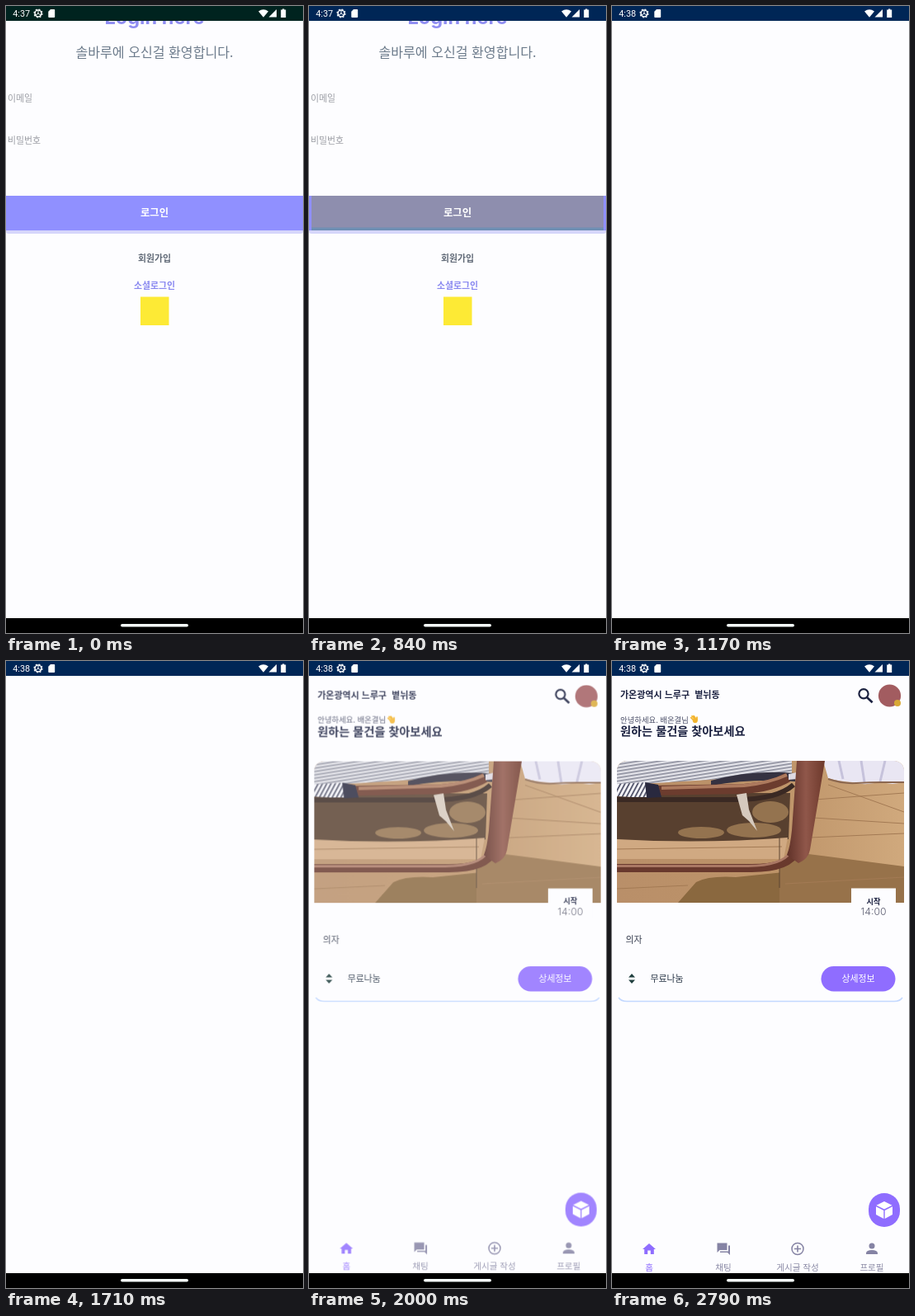
An HTML page for the animation above (2830 ms loop, 360 by 760 pixels).

```html
<!DOCTYPE html>
<html lang="ko">
<head>
<meta charset="utf-8">
<title>Login to home</title>
<style>
  html, body { margin: 0; width: 100%; height: 100%; overflow: hidden; background: #fdfdff; }
  svg { display: block; width: 360px; height: 760px; }
  text { font-family: "Noto Sans CJK KR", "Noto Sans CJK", "Noto Sans KR", sans-serif; font-size: 10.9px; white-space: pre; }
  .mid { text-anchor: middle; }
  .bold { font-weight: 700; }
  .latin { font-family: Inter, sans-serif; }
  .clock { font-family: Roboto, sans-serif; fill: #fff; }
  .ink { fill: #1b2140; }
  .hint { fill: #9b9da4; }
  .nav text { fill: #8b8aa6; font-size: 10.6px; text-anchor: middle; }
  .nav path { fill: #8583a4; }
  .nav .on { fill: #8f6dff; }
  #home { transform-origin: 180px 380px; }
</style>
</head>
<body>
<svg viewBox="0 0 360 760">
  <defs>
    <clipPath id="page"><rect y="18" width="360" height="724"/></clipPath>
    <clipPath id="photo"><path d="M6 293V133a12 12 0 0 1 12-12H342a12 12 0 0 1 12 12V293Z"/></clipPath>
    <pattern id="stripes" width="4" height="4" patternUnits="userSpaceOnUse" patternTransform="rotate(-9)">
      <rect width="4" height="4" fill="#e4e4ea"/><rect width="4" height="1.7" fill="#8d8f9e"/>
    </pattern>
    <pattern id="cuff" width="4.6" height="4" patternUnits="userSpaceOnUse" patternTransform="rotate(28)">
      <rect width="4.6" height="4" fill="#f3f3f8"/><rect width="1.7" height="4" fill="#4a4c63"/>
    </pattern>
    <linearGradient id="floor" x1="0" y1="0" x2="1" y2="0">
      <stop offset="0" stop-color="#b98f69"/><stop offset=".55" stop-color="#bd9368"/><stop offset="1" stop-color="#d0a97d"/>
    </linearGradient>
    <linearGradient id="leg" x1="0" y1="0" x2="1" y2="0">
      <stop offset="0" stop-color="#5f3128"/><stop offset=".5" stop-color="#90574a"/><stop offset="1" stop-color="#6d382b"/>
    </linearGradient>
  </defs>

  <rect width="360" height="760" fill="#fdfdff"/>

  <g id="login" clip-path="url(#page)">
    <text class="latin bold mid" x="180" y="22" style="font-size:23.6px" fill="#8f8df2">Login here</text>
    <text class="mid" x="180" y="61.5" style="font-size:16.1px;font-weight:500" fill="#6c7b8b">솔바루에 오신걸 환영합니다.</text>
    <text class="hint" x="2" y="115.5">이메일</text>
    <text class="hint" x="2" y="166.5">비밀번호</text>
    <path d="M0 270H360V273a3 3 0 0 1-3 3H3a3 3 0 0 1-3-3Z" fill="#d6d6fb"/>
    <rect y="230" width="360" height="42" fill="#9090ff"/>
    <g id="press">
      <rect x="3" y="230" width="354" height="42" fill="#8e8eae"/>
      <rect x="3" y="268.5" width="354" height="3.5" fill="#6f8fb4"/>
    </g>
    <text class="bold mid" x="180" y="255" style="font-size:12.4px" fill="#fff">로그인</text>
    <text class="bold mid" x="180" y="309.5" fill="#626b78">회원가입</text>
    <text class="bold mid" x="180" y="343" fill="#8a89f0">소셜로그인</text>
    <rect x="163" y="352.5" width="34.5" height="34.5" fill="#fdea35"/>
  </g>

  <g clip-path="url(#page)">
  <g id="home" opacity="0">
    <text class="bold ink" x="10" y="45" style="font-size:11px">가온광역시 느루구  볕뉘동</text>
    <text x="10" y="74.5" style="font-size:9.4px" fill="#4b4f68">안녕하세요. 배온결님</text>
    <g stroke="#f3b52f" stroke-width="1.8" stroke-linecap="round">
      <path d="M98 71L95.8 68.6M99.5 69.5L97 66.8M101 69L99 66.7M103 71V68.2"/>
      <circle cx="100.8" cy="72" r="2.2" fill="#f3b52f"/>
    </g>
    <text class="bold ink" x="10" y="90" style="font-size:14.2px">원하는 물건을 찾아보세요</text>
    <g fill="none" stroke="#1b2140" stroke-width="2.2">
      <circle cx="305" cy="39.8" r="5.6"/><path d="M309 44L315.6 50.3" stroke-width="2.6"/>
    </g>
    <circle cx="336.5" cy="42" r="13.6" fill="#a25c60"/>
    <circle cx="346" cy="51" r="4" fill="#d9a936"/>

    <path d="M7 400V402a10.5 10.5 0 0 0 10.5 10.5H342.500a10.5 10.5 0 0 0 10.5-10.5V400" fill="#fdfdff"/>
    <path d="M8 408Q11 412.500 18 412.500H342Q349 412.500 352 408" fill="none" stroke="#c3d8ff" stroke-width="1.6"/>

    <g clip-path="url(#photo)">
      <rect x="6" y="121" width="348" height="172" fill="url(#floor)"/>
      <path d="M6 160H216L214 216Q110 222 6 217Z" fill="#58402f"/>
      <g fill="#94734f">
        <ellipse cx="172" cy="205" rx="33" ry="9"/>
        <ellipse cx="108" cy="208" rx="28" ry="7"/>
        <ellipse cx="192" cy="183" rx="22" ry="13"/>
      </g>
      <path d="M6 216Q110 222 213 214L208 240H6Z" fill="#d0a982"/>
      <path d="M80 293L102 268Q118 260 150 262L208 256V293Z" fill="#8a683f"/>
      <path d="M203 246L238 234L354 249V293H203Z" fill="#97724a"/>
      <g stroke="#a37a54" fill="none" stroke-width="1">
        <path d="M6 228L206 225M6 276L92 272M246 168L354 160M244 190L354 197M240 214L354 209M210 270L354 262M262 150L354 183"/>
        <path d="M203 214V275" stroke="#5d4532"/>
      </g>
      <path d="M256 121H354V146Q340 152 326 146Q308 152 292 147Q274 146 262 142Z" fill="#e9e6f3"/>
      <path d="M275 121L280 143M302 121L306 147M331 121L325 146" stroke="#c6c2db" stroke-width="3"/>
      <path d="M262 143Q280 149 296 148T326 147T354 147" fill="none" stroke="#8c6850" stroke-width="2"/>
      <path d="M6 121H218V137Q190 135 150 142L52 148L6 150Z" fill="url(#stripes)"/>
      <path d="M6 149L42 147L44 166L6 164Z" fill="url(#cuff)"/>
      <path d="M120 145Q170 131 222 136V146Q170 142 120 151Z" fill="#353241"/>
      <path d="M6 168H150Q200 168 220 150" fill="none" stroke="#3a2923" stroke-width="6"/>
      <path d="M46 157L160 155Q192 153 213 141" fill="none" stroke="#6c3c2e" stroke-width="12"/>
      <path d="M60 154L160 151Q190 148 212 138" fill="none" stroke="#ad7a5e" stroke-width="4"/>
      <path d="M40 147L56 150L60 165L42 166Z" fill="#29293f"/>
      <path d="M214 137L224 135L224 143L214 144Z" fill="#ded9e2"/>
      <path d="M6 251H165Q214 252 224 230" fill="none" stroke="#69392d" stroke-width="10"/>
      <path d="M6 248.500H165Q206 248 216 232" fill="none" stroke="#aa7864" stroke-width="3"/>
      <path d="M224 121H258L240 229Q238 240 226 245L212 235Q216 225 218 205Z" fill="url(#leg)"/>
      <path d="M151 162L163 160L166 180L176 206L166 194L158 187Z" fill="#d5c9bd"/>
    </g>
    <rect x="290" y="275.500" width="54" height="36" fill="#fdfdff"/>
    <text class="bold mid ink" x="317" y="294.500" style="font-size:9.2px">시작</text>
    <text class="latin mid" x="317" y="308" style="font-size:12.2px;font-weight:300" fill="#5b5c70">14:00</text>

    <text x="16.500" y="342" fill="#3a4052">의자</text>
    <path d="M20 383.500L24 379L28 383.500ZM20 386.500L24 391L28 386.500Z" fill="#21403f"/>
    <text x="46.500" y="389" fill="#2a3748">무료나눔</text>
    <rect x="253.500" y="370" width="90" height="30.500" rx="15.250" fill="#8f6dff"/>
    <text class="mid" x="298.500" y="389" style="font-weight:500" fill="#fff">상세정보</text>

    <rect x="311" y="645" width="38" height="41" rx="19" fill="#8f6dff"/>
    <g fill="#fff">
      <path d="M330 655L339.500 659.800L330 664.600L320.500 659.800Z"/>
      <path d="M320 661.300L329.300 666V676L320 671Z"/>
      <path d="M340 661.300L330.700 666V676L340 671Z"/>
    </g>

    <g class="nav">
      <path class="on" d="M45 706L53 713H50.800V719H46.800V714.500H43.200V719H39.200V713H37Z"/>
      <path d="M127.500 705.500H139.500V714H130.500L127.500 717ZM141 708.500H143V720L140 717H131V715.500H141Z"/>
      <circle cx="225" cy="712.500" r="7" fill="none" stroke="#8583a4" stroke-width="1.5"/>
      <path d="M224.200 708.500H225.800V711.700H229V713.300H225.800V716.500H224.200V713.300H221V711.700H224.200Z"/>
      <circle cx="315" cy="709" r="3.500" fill="#8583a4"/>
      <path d="M308 719V717.500Q308.500 714 315 714T322 717.500V719Z"/>
      <text class="on" x="45" y="738.500">홈</text>
      <text x="135" y="738.500">채팅</text>
      <text x="225" y="738.500">게시글 작성</text>
      <text x="315" y="738.500">프로필</text>
    </g>
  </g>
  </g>

  <rect id="bar" width="360" height="18" fill="#002656"/>
  <text id="before" class="clock" x="8.200" y="13">4:37</text>
  <text id="after" class="clock" x="8.200" y="13" opacity="0">4:38</text>
  <g fill="none" stroke="#fff">
    <circle cx="39" cy="9" r="3.900" stroke-width="1.500"/>
    <circle cx="39" cy="9" r="5" stroke-width="1.200" stroke-dasharray="1.960 1.960"/>
    <path d="M39 9V5.500M39 9L36 11M39 9L42 11"/>
  </g>
  <g fill="#fff">
    <path d="M54 4H58.300Q59.200 4 59.200 5V13Q59.200 14 58.300 14H52.200Q51.300 14 51.300 13V6.700Z"/>
    <path d="M306 6.500Q312 1.800 318 6.500L312 13.800Z"/>
    <path d="M328 4V13.500H318.500Z"/>
    <path d="M335 3.500H337.300V4.600H339.200V14H333.200V4.600H335Z"/>
  </g>
  <rect y="742" width="360" height="18"/>
  <rect x="139" y="749" width="82" height="3.600" rx="1.800" fill="#f4fbf9"/>
</svg>
<script>
  const LOOP = 2830, CUT = 1130;

  // steps: [time in ms, styles]; hold keeps each value until the next step
  function play(id, steps, hold) {
    const frames = steps.map(([ms, style]) => ({
      ...style, offset: ms / LOOP, easing: hold ? 'step-end' : 'linear'
    }));
    document.getElementById(id).animate(frames, { duration: LOOP, iterations: Infinity });
  }

  const fade = (...pairs) => pairs.map(([ms, opacity]) => [ms, { opacity }]);
  const enter = (ms, opacity, scale) => [ms, { opacity, transform: `scale(${scale})` }];

  play('login', fade([0, 1], [CUT, 0], [LOOP, 0]), true);
  play('before', fade([0, 1], [CUT, 0], [LOOP, 0]), true);
  play('after', fade([0, 0], [CUT, 1], [LOOP, 1]), true);
  play('press', fade([0, 0], [340, 0.55], [840, 1], [LOOP, 1]));
  play('bar', [[0, { fill: '#00231f' }], [40, { fill: '#002656' }], [LOOP, { fill: '#002656' }]], true);
  play('home', [
    enter(0, 0, 0.96),
    enter(1840, 0, 0.96),
    enter(1880, 0.15, 0.978),
    enter(1920, 0.35, 0.9885),
    enter(1960, 0.6, 0.995),
    enter(2000, 0.83, 0.998),
    enter(2050, 1, 1),
    enter(LOOP, 1, 1)
  ]);
</script>
</body>
</html>
```
